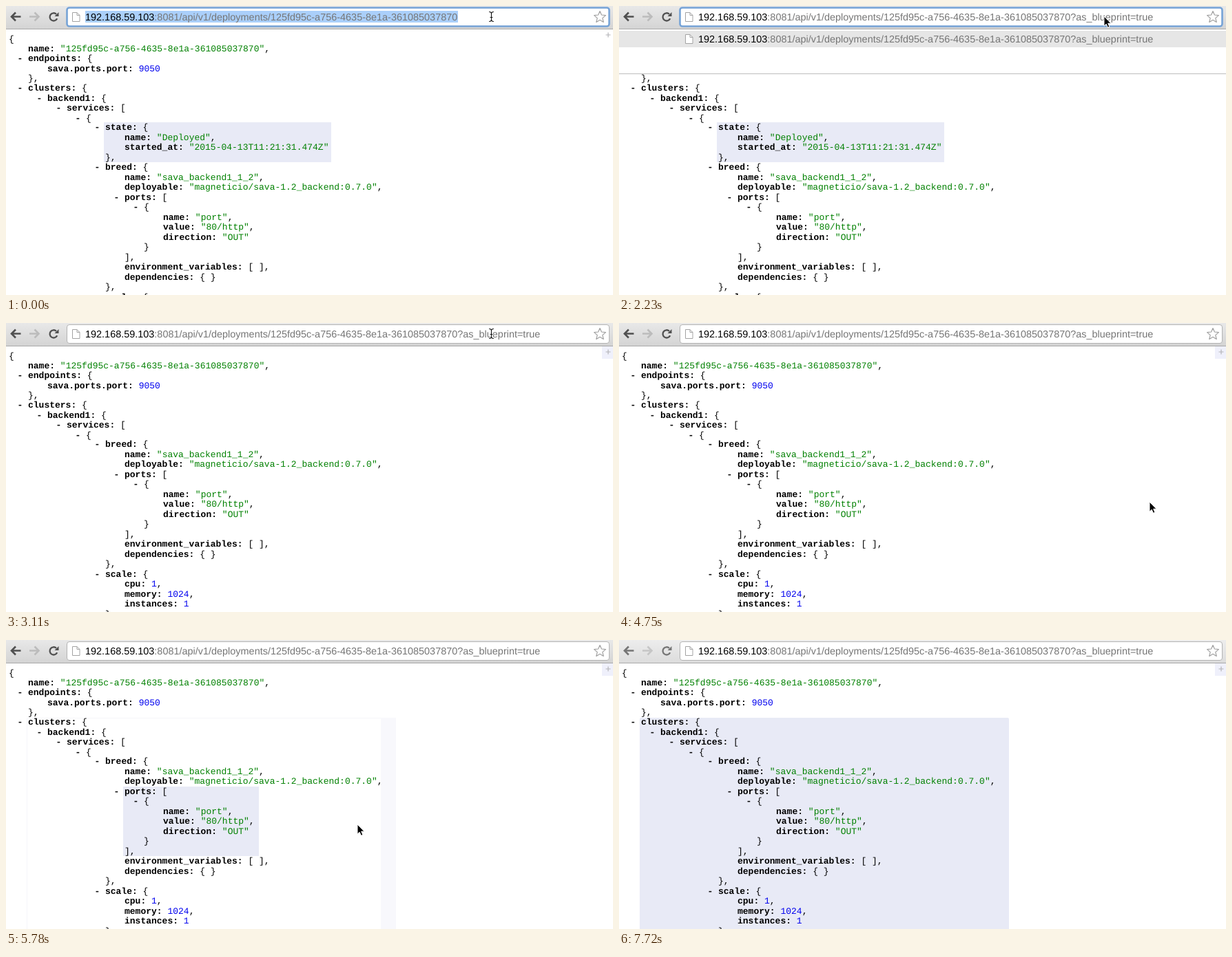
Write an HTML page that moves like this. It is 881 px wide and 420 px high and loops after 7.82 s.

```html
<!DOCTYPE html>
<html lang="en">
<head>
<meta charset="utf-8">
<title>Deployment JSON</title>
<style>
  html, body { margin: 0; width: 100%; height: 100%; overflow: hidden; background: #fff; }
  svg { display: block; width: 881px; height: 420px; }
  text { white-space: pre; text-rendering: geometricPrecision; }
  .json { font: 13px "Liberation Mono", "Courier New", monospace; fill: #000; }
  .key { font-weight: bold; }
  .str { fill: #008000; }
  .num { fill: #0000ee; }
  .url { font: 14.45px "Liberation Sans", Arial, sans-serif; fill: #767676; }
  .host { fill: #000; }
  .hover { fill: #e8eaf6; }
</style>
</head>
<body>
<svg viewBox="0 0 881 420" xmlns="http://www.w3.org/2000/svg">
  <defs>
    <linearGradient id="bar" x2="0" y2="1">
      <stop offset="0" stop-color="#e8e8e8"/>
      <stop offset="1" stop-color="#d4d4d4"/>
    </linearGradient>
    <g id="sheet" fill="#fff" stroke="#a3a3a3">
      <path d="M96.5 9.5h6.5l4 4v9h-10.500z"/>
      <path d="M103 9.500v4h4" fill="none"/>
    </g>
  </defs>
  <rect width="881" height="420" fill="#fff"/>

  <rect id="state" class="hover" x="142" y="169" width="330" height="58"/>
  <rect id="clusters" class="hover" x="30" y="113" width="536" height="310" rx="2"/>
  <g id="rim">
    <path d="M30.500 420V113.500H545" fill="none" stroke="#f6f6fa"/>
    <rect x="544" y="113" width="22" height="307" fill="#f8f8fc"/>
  </g>
  <rect id="ports" class="hover" x="170" y="213" width="197" height="101"/>
  <g id="before" class="json"></g>
  <g id="after" class="json"></g>

  <rect id="plusBox" x="865" y="34" width="16" height="18" fill="#eff0fb"/>
  <path d="M870.500 42h7M874 38.500v7" stroke="#b4b4b8" stroke-width="1.2"/>

  <g id="popup">
    <rect y="33" width="881" height="65" fill="#fff"/>
    <rect y="36" width="881" height="24" fill="#e6e6e6"/>
    <use href="#sheet" y="32"/>
    <text id="match" class="url" x="115" y="53"></text>
    <path d="M0 98.500H881" stroke="#bdbdbd"/>
  </g>

  <rect id="toolbar" width="881" height="33" fill="url(#bar)"/>
  <path d="M0 33.500H881" stroke="#a9a9a9"/>
  <g id="buttons" fill="none" stroke="#505050" stroke-width="2.600">
    <path d="M21.500 15.500H8.500M14 9.500l-6 6 6 6"/>
    <path d="M34 15.500H47M41.500 9.500l6 6-6 6" stroke="#bcbcbc"/>
    <g id="reload">
      <path d="M74.200 18.300A5.600 5.600 0 1 1 73 11.800" stroke-width="2.300"/>
      <path d="M76.500 9v6h-6z" fill="#505050" stroke="none"/>
    </g>
    <path id="stop" d="M64 10.500l11 11M75 10.500l-11 11"/>
  </g>
  <rect id="field" x="88.500" y="2.500" width="787" height="27" rx="3.500" fill="#fff"/>
  <use href="#sheet"/>
  <rect id="selection" x="115" y="7" width="541" height="17" fill="#aacffa"/>
  <text id="address" class="url" x="115" y="21"></text>
  <rect id="caret" y="7" width="1" height="17" fill="#000"/>
  <path id="star" fill="#fff" stroke="#a0a0a0" stroke-width="1.200" stroke-linejoin="round"/>

  <g id="beam" fill="none" stroke-linecap="round">
    <path id="beamLine" d="M701.500 8.500q2.500 0 3 2q.5-2 3-2M704.500 10.500v10M701.500 22.500q2.500 0 3-2q.5 2 3 2M703 16.500h3" stroke="#fff" stroke-width="2.800"/>
    <use href="#beamLine" style="display:none"/>
    <path d="M701.500 8.500q2.500 0 3 2q.5-2 3-2M704.500 10.500v10M701.500 22.500q2.500 0 3-2q.5 2 3 2M703 16.500h3" stroke="#111" stroke-width="1.100"/>
  </g>
  <path id="arrow" d="M0 0V14.200L3.200 11.200L5.500 16.300L7.900 15.200L5.700 10.200H10z" fill="#000" stroke="#fff" stroke-linejoin="round"/>
</svg>
<script>
const LOOP = 7820;
const $ = id => document.getElementById(id);
const host = '192.168.59.103';
const uuid = '125fd95c-a756-4635-8e1a-361085037870';
const path = ':8081/api/v1/deployments/' + uuid;
const query = '?as_blueprint=true';

// Each line: nesting depth, a space, then the text.
const head = `0 {
1 name: "${uuid}",
1 endpoints: {
2 sava.ports.port: 9050
1 },
1 clusters: {
2 backend1: {
3 services: [
4 {`;
const state = `5 state: {
6 name: "Deployed",
6 started_at: "2015-04-13T11:21:31.474Z"
5 },`;
const breed = `5 breed: {
6 name: "sava_backend1_1_2",
6 deployable: "magneticio/sava-1.2_backend:0.7.0",
6 ports: [
7 {
8 name: "port",
8 value: "80/http",
8 direction: "OUT"
7 }
6 ],
6 environment_variables: [ ],
6 dependencies: { }
5 },
5 scale: {
6 cpu: 1,
6 memory: 1024,
6 instances: 1
5 },`;

const span = (cls, s) => `<tspan class="${cls}">${s}</tspan>`;
const lineY = i => Math.round(i < 9 ? 51.7 + 14.35 * i : 180 + 14.53 * (i - 9));

function paint(text) {
  const key = text.match(/^([\w.]+:)?/)[0];
  const value = text.slice(key.length)
    .replace(/"[^"]*"|\b\d+\b/g, s => span(s[0] === '"' ? 'str' : 'num', s));
  return (key && span('key', key)) + value;
}

function fillJson(id, source) {
  $(id).innerHTML = source.split('\n').map((line, i) => {
    const depth = +line[0], text = line.slice(2);
    const x = 4 + 28 * depth, y = lineY(i);
    const opens = depth && /[{[]$/.test(text);
    const toggle = opens ? `<text class="key" x="${x - 15.6}" y="${y}">-</text>` : '';
    return `${toggle}<text x="${x}" y="${y}">${paint(text)}</text>`;
  }).join('');
}

const urlMarkup = tail => span('host', host) + path + tail;

function starPath(cx, cy, r) {
  const points = Array.from({ length: 10 }, (_, i) => {
    const a = Math.PI * (i / 5 - 0.5), d = i % 2 ? r * 0.46 : r;
    return (cx + d * Math.cos(a)).toFixed(1) + ' ' + (cy + d * Math.sin(a)).toFixed(1);
  });
  return 'M' + points.join('L') + 'z';
}

// Pointer stops: time, x, y; it jumps from one to the next.
const stops = [
  [1490, 704, 15], [2670], [4460, 776, 95], [4610, 828, 215], [4750, 770, 260],
  [4900, 650, 266], [5050, 540, 270], [5340, 518, 272], [5490, 515, 270],
  [5780, 510, 268], [5930, 500, 252], [6080, 486, 222], [6230, 474, 184],
  [6670, 580, 225], [6820, 681, 280], [6970]
];
// Highlight strengths: time, opacity.
const clusterGlow = [[0, 0], [4900, 0.3], [5050, 0], [6670, 0.4], [6820, 0.8], [6970, 1]];
const portGlow = [[0, 0], [5340, 0.5], [5490, 1], [6670, 0]];

const latest = (list, t) => list.filter(s => s[0] <= t).pop();
const show = (id, on) => { $(id).style.display = on ? '' : 'none'; };
const set = (id, name, value) => $(id).setAttribute(name, value);

let shownTail = null;
function setAddress(tail) {
  if (tail === shownTail) return;
  shownTail = tail;
  $('address').innerHTML = urlMarkup(tail);
}

function draw(t) {
  const within = (a, b) => t >= a && t < b;
  const typed = t >= 1630, loaded = t >= 2820, focused = t < 2670;

  setAddress(typed ? query : '');
  show('selection', t < 300);
  show('caret', within(300, 1040) || within(1630, 2230));
  set('caret', 'x', typed ? 774 : 655);
  show('popup', within(1630, 2670));
  set('field', 'stroke', focused ? '#76a3d6' : '#b3b3b3');
  set('field', 'stroke-width', focused ? 2.6 : 1);

  const loading = within(2670, 2960);
  show('stop', loading);
  show('reload', !loading);
  show('before', !loaded);
  show('state', !loaded);
  show('after', loaded);
  show('plusBox', t >= 3110);

  set('clusters', 'opacity', latest(clusterGlow, t)[1]);
  set('ports', 'opacity', latest(portGlow, t)[1]);
  show('rim', within(5050, 6670));

  const idle = t >= 7720;
  set('buttons', 'opacity', idle ? 0.75 : 1);
  set('toolbar', 'opacity', idle ? 0.8 : 1);

  const stop = latest(stops, t);
  const pointing = stop && stop.length > 1;
  show('arrow', pointing);
  if (pointing) set('arrow', 'transform', `translate(${stop[1]} ${stop[2]})`);
  show('beam', t < 1490 || within(2670, 4460));
}

fillJson('before', [head, state, breed].join('\n'));
fillJson('after', [head, breed].join('\n'));
$('match').innerHTML = urlMarkup(query);
set('star', 'd', starPath(862, 16.3, 8.8));

const start = performance.now();
function tick() {
  draw((performance.now() - start) % LOOP);
  requestAnimationFrame(tick);
}
tick();
</script>
</body>
</html>
```
